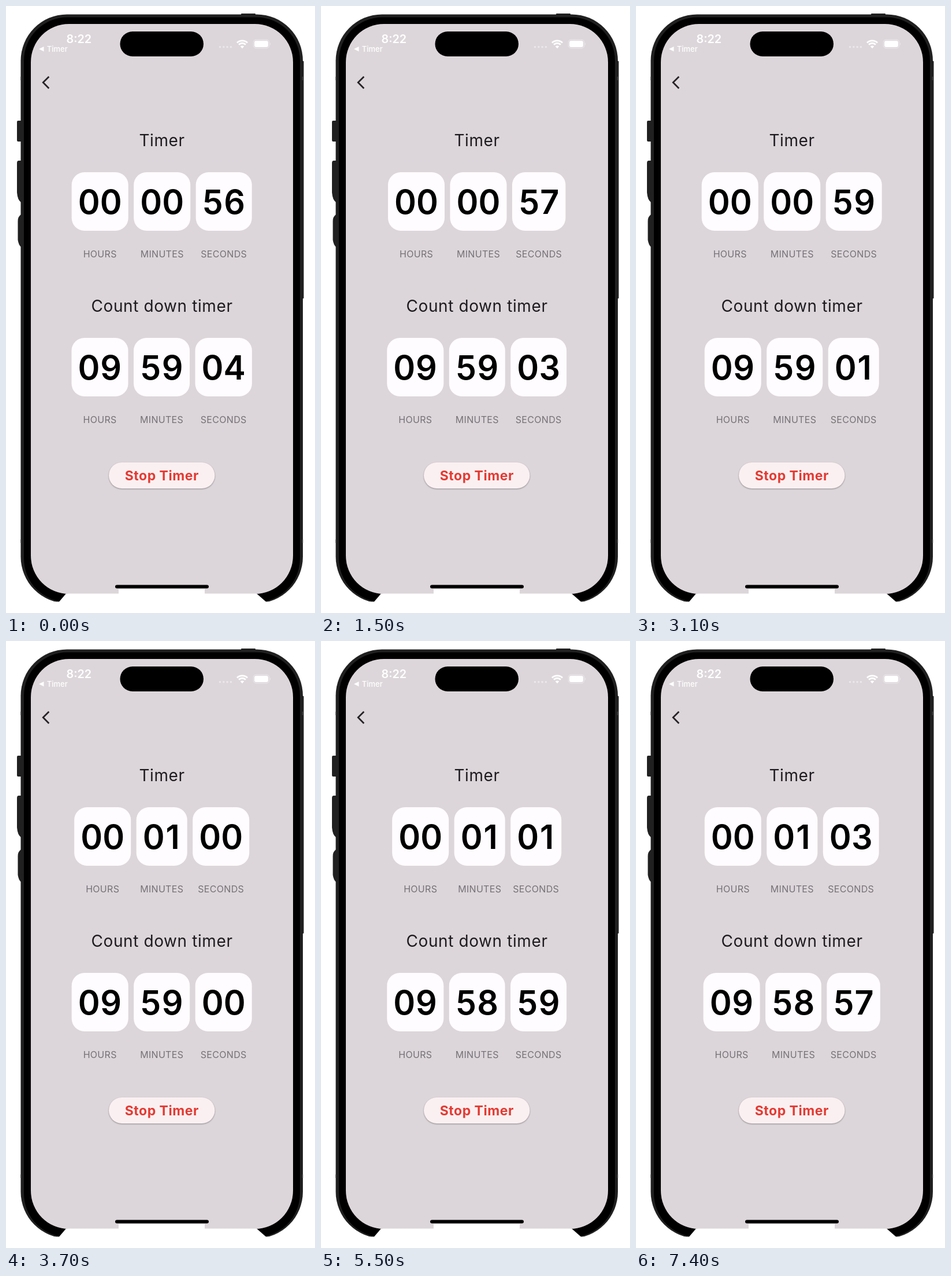
An HTML page for the animation above (7.5 s loop, 535 by 1048 pixels).

```html
<!DOCTYPE html>
<html lang="en">
<head>
<meta charset="utf-8">
<title>Timer</title>
<style>
  html, body { margin: 0; width: 100%; height: 100%; overflow: hidden; background: #fff; }
  svg { display: block; width: 100vw; height: 100vh; }
  text { font-family: Inter, Roboto, sans-serif; }
  .centered text { text-anchor: middle; }
  .title { font-size: 28px; letter-spacing: .6px; fill: #1d1b1f; }
  .label { font-size: 16px; letter-spacing: .3px; fill: #757176; }
  .digit { font-size: 57.5px; font-weight: 600; }
  .card { fill: #fffcff; }
  .button { fill: #fbf0f1; filter: drop-shadow(0 1.5px 1.3px rgba(0, 0, 0, .36)); }
  .button-text { font-size: 23px; font-weight: 700; letter-spacing: .5px; fill: #e43a32; }
</style>
</head>
<body>
<svg viewBox="0 0 535 1048">
  <!-- Phone body -->
  <g fill="#202020">
    <rect x="19" y="198" width="10" height="36" rx="2"/>
    <path d="M26 267H22Q19 267 19 271V322Q20 335 26 339Z"/>
    <path d="M26 360Q20 364 20.500 372V404Q22 413 26 416Z"/>
    <rect x="511" y="95" width="4.500" height="410" rx="1"/>
    <rect x="407" y="13" width="25" height="4" rx="1"/>
    <rect x="25.500" y="14.500" width="488.500" height="1016.500" rx="80"/>
  </g>
  <rect x="31" y="19.500" width="478" height="1009.500" rx="75"/>
  <path d="M26 122v6M26 921v6M513.500 122v6M513.500 921v6" stroke="#444" stroke-width="1.500"/>
  <rect x="43" y="31" width="454" height="984" rx="66" fill="#dcd6da"/>
  <path d="M0 1028.500H92L104 1014.500H434L450 1028.500H535V1048H0Z" fill="#fff"/>
  <rect x="195" y="1006.500" width="149" height="10" fill="#fff"/>
  <rect x="189" y="999.500" width="162" height="6" rx="3"/>
  <rect x="197.500" y="44" width="144.500" height="43" rx="21.500"/>

  <!-- Status bar -->
  <g fill="#fff">
    <text x="104.500" y="63.500" font-size="19.800" font-weight="600">8:22</text>
    <path d="M57 74.200L65.500 70V78.400Z"/>
    <text x="70.700" y="79" font-size="13" font-weight="500">Timer</text>
    <g opacity=".45">
      <circle cx="370.500" cy="70.800" r="1.700"/><circle cx="376.800" cy="70.800" r="1.700"/>
      <circle cx="383.100" cy="70.800" r="1.700"/><circle cx="389.400" cy="70.800" r="1.700"/>
    </g>
    <path d="M400 63.500A12.800 12.800 0 0 1 418 63.500M403.100 66.700A8.300 8.300 0 0 1 414.900 66.700"
          fill="none" stroke="#fff" stroke-width="2.800"/>
    <path d="M409 73.200L405.800 69.800A4.500 4.500 0 0 1 412.200 69.800Z"/>
    <rect x="428.300" y="58.200" width="27.500" height="14.600" rx="4.500" fill="none" stroke="#fff" opacity=".45"/>
    <rect x="430" y="60" width="24" height="11" rx="3"/>
    <path d="M457.300 63.300Q459.300 65.500 457.300 67.700Z" opacity=".5"/>
  </g>
  <path d="M74.300 122L64.200 132L74.300 142.200" fill="none" stroke="#242226" stroke-width="2.700"/>

  <g class="centered">
    <text class="title" x="270" y="241.500">Timer</text>
    <text class="title" x="270" y="528">Count down timer</text>
    <g id="up"></g>
    <g id="down"></g>
    <rect class="button" x="178" y="788" width="183.500" height="45" rx="22.500"/>
    <text class="button-text" x="269.800" y="818.500">Stop Timer</text>
  </g>
</svg>
<script>
  const LOOP = 7500, CENTER = 269.7, GAP = 9.5, PADDING = 11;
  const LABELS = ["HOURS", "MINUTES", "SECONDS"];
  // Advance widths of the digits 0 to 9; they set the width of each card.
  const ADVANCE = [38, 28, 35.7, 36.8, 38.3, 37, 38, 33.4, 37.8, 38];

  const advance = digit => ADVANCE[digit];
  const cardWidth = pair => advance(pair[0]) + advance(pair[1]) + 2 * PADDING;
  const text = (kind, x, y, content) =>
    `<text class="${kind}" x="${x}" y="${y}">${content}</text>`;

  function clockMarkup(total, top) {
    const pairs = [total / 3600, total / 60 % 60, total % 60]
      .map(value => String(Math.floor(value)).padStart(2, "0"));
    const rowWidth = pairs.reduce((sum, pair) => sum + cardWidth(pair), 2 * GAP);
    let left = CENTER - rowWidth / 2;
    return pairs.map((pair, i) => {
      const width = cardWidth(pair), [first, second] = pair;
      const start = left + PADDING, middle = start + advance(first);
      const markup =
        `<rect class="card" x="${left}" y="${top}" width="${width}" height="101" rx="22"/>` +
        text("digit", start + advance(first) / 2, top + 72, first) +
        text("digit", middle + advance(second) / 2, top + 72, second) +
        text("label", left + width / 2, top + 146.5, LABELS[i]);
      left += width + GAP;
      return markup;
    }).join("");
  }

  const up = document.getElementById("up"), down = document.getElementById("down");
  const start = performance.now();
  let shown = -1;

  function draw(now) {
    const time = Math.max(0, now - start) % LOOP;
    const ticks = Math.floor((time + 300) / 1000);
    if (ticks !== shown) {
      up.innerHTML = clockMarkup(56 + ticks, 287);
      down.innerHTML = clockMarkup(9 * 3600 + 59 * 60 + 4 - ticks, 573);
      shown = ticks;
    }
    requestAnimationFrame(draw);
  }
  draw(start);
</script>
</body>
</html>
```
